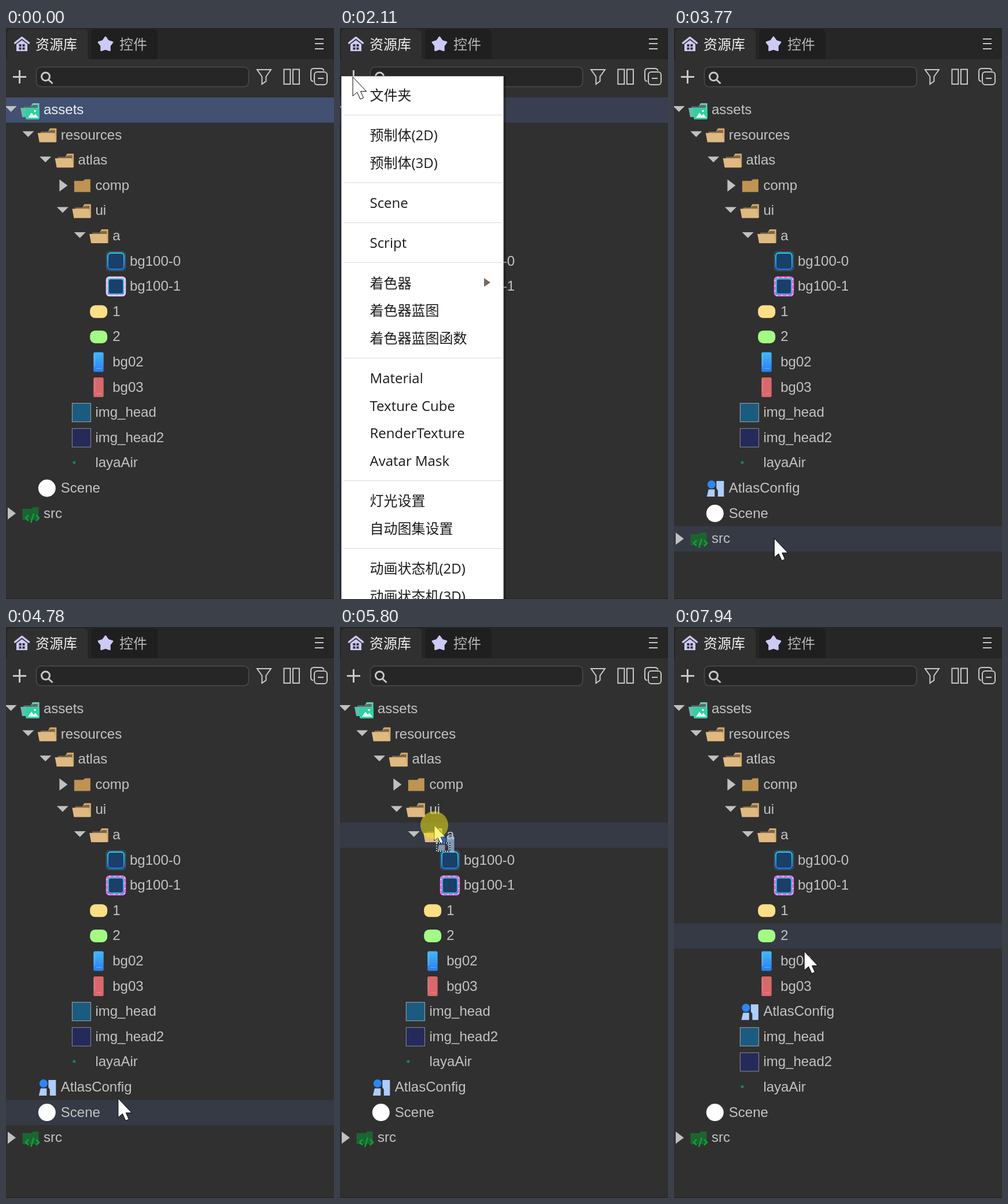
These frames come from a looping animation (567x987 px, 8000 ms). An HTML page:

```html
<!DOCTYPE html>
<html lang="zh-CN">
<head>
<meta charset="utf-8">
<title>Asset panel</title>
<style>
html, body { margin: 0; width: 100%; height: 100%; overflow: hidden; background: #303030; }
svg { display: block; width: 100%; height: 100%; }
.tree { font: 24px "Liberation Sans", Arial, sans-serif; fill: #c3c3c3; }
.tab { font: 24px "Noto Sans CJK SC", "Noto Sans CJK", sans-serif; }
.menu { font: 24px "Open Sans", "Noto Sans CJK SC", "Noto Sans CJK", sans-serif; fill: #1b1b1b; }
.line { fill: none; stroke: #c8c8c8; stroke-width: 2; }
.bold { stroke-width: 3; }
</style>
</head>
<body>
<svg id="stage" viewBox="0 0 567 987" preserveAspectRatio="none"></svg>
<script>
const DURATION = 8000, ROW = 43.6, TOP = 120, INDENT = 29.8;
const MENU_ROW = 47.6, MENU_GAP = 21.7;
const MENU_OPEN = 2050, MENU_CLOSE = 3470, CREATED = 3560, MOVED = 7070;
const PRESSES = [[1780, 1980], [3360, 3470], [5330, 6930]];
const DRAG = [5400, 6930];
const HOVER_LAG = 25;

// time, x, y of the pointer tip
const PATH = [
  [0, 600, 900], [70, 566, 893], [400, 330, 520], [830, 117, 142], [1100, 117, 142],
  [1360, 65, 134], [1640, 22, 84], [2100, 22, 84], [2500, 92, 490], [2820, 138, 840],
  [3160, 140, 856], [3500, 140, 856], [4110, 249, 939], [4170, 260, 946], [4350, 260, 946],
  [4780, 194, 815], [5130, 150, 787], [5330, 150, 787], [5800, 163, 343], [6070, 157, 269],
  [6330, 154, 233], [7580, 154, 233], [7940, 225, 560], [8000, 230, 580]
];

const rect = (x, y, w, h, fill, extra = "") =>
  `<rect x="${x}" y="${y}" width="${w}" height="${h}" fill="${fill}" ${extra}/>`;
const shape = (d, fill, extra = "") => `<path d="${d}" fill="${fill}" ${extra}/>`;
const dot = (x, y, r, fill) => `<circle cx="${x}" cy="${y}" r="${r}" fill="${fill}"/>`;
const line = (d, weight = "") => `<path class="line ${weight}" d="${d}"/>`;

const openFolder = (back, front) =>
  shape("M-11 -6H2L5 -11.5H16.5V12H-11Z", back) +
  shape("M-12 -6.5H3L5.5 -8.5H14V-3.5H-12Z", "#303030", 'opacity=".55"') +
  shape("M-16 -3.5H12.5L15.5 12.5H-13Z", front);
const closedFolder = fill => shape("M-12.5 -8H3L6 -10.8H15.5V11.2H-12.5Z", fill);
const tile = (fill, stroke) => rect(-16, -16, 32, 32, fill, `stroke="${stroke}"`);
const slab = (fill, glow) =>
  rect(-9, -17, 17.5, 34, fill, 'rx="2.5"') +
  shape("M-7 -13V8M-4 11H5", "none", `stroke="${glow}" stroke-width="1.2" opacity=".5"`);
const frame =
  rect(-16.5, -16.5, 33, 33, "#1d4360", 'rx="5" stroke="#58616b"') +
  rect(-14, -14, 28, 28, "#1a3f69", 'rx="5" stroke="url(#cyan)" stroke-width="2"');

const icons = {
  assets: openFolder("#73cbb8", "#62bda9") + rect(-7, -2, 24, 18.5, "#2ed1a4", 'rx="2"') +
    shape("M-3 13.5L3 5L7 10L10 7L15 13.5Z", "#fff") + dot(9, 2, 1.8, "#fff"),
  open: openFolder("#d6aa6c", "#e0b981"),
  closed: closedFolder("#bf9352"),
  src: closedFolder("#1b6530") + `<g transform="translate(3 7)">` +
    shape("M-5 -4L-10 1L-5 6M8 -4L13 1L8 6M4 -7L-1 9", "none", 'stroke="#12a237" stroke-width="2.5"') + "</g>",
  frameBlue: frame,
  framePink: frame + rect(-15.5, -15.5, 31, 31, "none", 'id="pink" rx="4" stroke-width="3.5"') +
    rect(-15.5, -15.5, 31, 31, "none", 'rx="4" stroke="#fbe9ff" stroke-width="1.5" stroke-dasharray="2 7"') +
    rect(-12.8, -12.8, 25.6, 25.6, "none", 'rx="4" stroke="#35b9de" stroke-width="1.5"'),
  yellow: rect(-15, -11, 30, 22, "#fbde86", 'rx="9"'),
  green: rect(-15, -11, 30, 22, "#a3fb84", 'rx="9"'),
  blueSlab: slab("url(#blue)", "#9be0ff"),
  redSlab: slab("#d9686c", "#f0a0b0"),
  teal: tile("#1b5b80", "#a2aab0"),
  navy: tile("#242a5a", "#8a8d9c"),
  tiny: dot(-12.5, -1, 2.5, "#18806d"),
  scene: dot(0, 0, 15, "#fff"),
  config: dot(-6, -6.500, 7, "#2b86f6") + shape("M-11 2H-0.5V14.5H-14Z", "#aecdfa") +
    shape("M2.5 -12.5H15.5V14.5H5V4L2.5 0Z", "#aecdfa")
};

// label, depth, icon, arrow (v open, > closed)
const rows = [
  ["assets", 0, "assets", "v"], ["resources", 1, "open", "v"], ["atlas", 2, "open", "v"],
  ["comp", 3, "closed", ">"], ["ui", 3, "open", "v"], ["a", 4, "open", "v"],
  ["bg100-0", 5, "frameBlue"], ["bg100-1", 5, "framePink"], ["1", 4, "yellow"], ["2", 4, "green"],
  ["bg02", 4, "blueSlab"], ["bg03", 4, "redSlab"], ["img_head", 3, "teal"], ["img_head2", 3, "navy"],
  ["layaAir", 3, "tiny"], ["Scene", 1, "scene"], ["src", 0, "src", ">"]
];
const arrows = { v: "M-1.5 -6H18.5L8.5 4Z", ">": "M3 -10L17 0.5L3 11Z" };

const rowBody = ([label, , icon, arrow]) =>
  (arrow ? shape(arrows[arrow], "#c0c0c0") : "") +
  `<g transform="translate(41 0.5)">${icons[icon]}</g><text x="65" y="8">${label}</text>`;

const menuItems = ["文件夹", "-", "预制体(2D)", "预制体(3D)", "-", "Scene", "-", "Script", "-",
  "着色器", "着色器蓝图", "着色器蓝图函数", "-", "Material", "Texture Cube", "RenderTexture",
  "Avatar Mask", "-", "灯光设置", "自动图集设置", "-", "动画状态机(2D)", "动画状态机(3D)"];
const menuTops = [];

function buildMenu() {
  let y = 117 - MENU_ROW, body = "";
  for (const item of menuItems) {
    if (item === "-") {
      body += rect(6, Math.round(y + 32.7), 274, 1, "#d9d9d9");
      y += MENU_GAP;
      continue;
    }
    y += MENU_ROW;
    menuTops.push(y - 25.6);
    body += `<text x="51.5" y="${y + 7.8}">${item}</text>`;
    if (item === "着色器") body += shape(`M249 ${y - 9.5}L260 ${y - 2}L249 ${y + 5.5}Z`, "#75695f");
  }
  return `<g id="menu" class="menu">` + rect(0, 82, 287, 910, "#000", 'opacity=".25"') +
    rect(2.5, 83.5, 280, 920, "#fff", 'stroke="#b4b4b4"') +
    `<rect id="menuHover" x="4" width="278" height="${MENU_ROW}" fill="#e6e6e6"/>${body}</g>`;
}

function starPoints(cx, cy, outer, inner) {
  return Array.from({ length: 10 }, (_, i) => {
    const r = i % 2 ? inner : outer, a = (i / 5 - 0.5) * Math.PI;
    return `${cx + r * Math.cos(a)},${cy + r * Math.sin(a)}`;
  }).join(" ");
}

const header =
  rect(0, 0, 567, 54, "#262626") +
  shape("M2 54V10Q2 2 10 2H133Q141 2 141 10V54Z", "#303030") +
  shape("M147 54V10Q147 2 155 2H254Q262 2 262 10V54Z", "#1f1f1f") +
  shape("M15.500 26L27.500 16.500L39.500 26", "none", 'stroke="#cdcaf6" stroke-width="3.5" stroke-linecap="round" stroke-linejoin="round"') +
  shape("M18 28L27.500 21L37 28V40H18Z", "#cdcaf6") +
  shape("M22.500 28H26.500V32H22.500ZM28.500 28H32.500V32H28.500ZM22.500 33.500H26.500V37.500H22.500ZM28.500 33.500H32.500V37.500H28.500Z", "#303030") +
  `<polygon points="${starPoints(172, 28.5, 12.5, 7.5)}" fill="#cdcaf6" stroke="#cdcaf6" stroke-width="3" stroke-linejoin="round"/>` +
  `<g class="tab"><text x="51" y="37" fill="#f0f0f0">资源库</text><text x="196" y="37" fill="#b8b8b8">控件</text></g>` +
  line("M534 19H549M534 27H549M534 36H549") +
  line("M12 84.5H35M23.5 73V96", "bold") +
  rect(52.5, 67.5, 367, 34, "#262626", 'rx="8" stroke="#4b4b4b" stroke-width="1.5"') +
  line("M61.5 84a7 7 0 1 0 14 0a7 7 0 1 0 -14 0M73.5 89.5L80.5 96", "bold") +
  line("M434 72H458L449.5 84V92L442.5 97V84Z") +
  line("M480.5 71.5H491.5V97H480.5ZM496 71.5H507V97H496Z") +
  line("M531 92Q527 92 527 87V75Q527 70 532 70H544Q549 70 549.5 74") +
  rect(533, 76, 22, 22, "none", 'class="line" rx="5"') + line("M539 87H549");

const arrowShape = shape("M0 0V33L7.5 26.5L13 38.5L18.5 36L13.5 25H23.5Z", "#fff", 'stroke="#000"');

const stage = document.getElementById("stage");
stage.innerHTML = `<defs>
  <linearGradient id="cyan" x1="0" y1="0" x2="0" y2="1"><stop stop-color="#25d5f5"/><stop offset="1" stop-color="#1b80ee"/></linearGradient>
  <linearGradient id="blue" x1="0" y1="0" x2="0" y2="1"><stop stop-color="#43b8f7"/><stop offset="1" stop-color="#2b7cf3"/></linearGradient>
  </defs>` +
  rect(0, 0, 567, 987, "#303030") + header +
  `<rect id="hover" width="567" height="${ROW}" fill="#353a44"/>` +
  `<rect id="selected" y="${TOP}" width="567" height="${ROW}"/>` +
  `<g class="tree">${rows.map(r => `<g class="row">${rowBody(r)}</g>`).join("")}
  <g id="config">${rowBody(["AtlasConfig", 1, "config"])}</g></g>` +
  rect(0, 986, 567, 1, "#202020") + buildMenu() +
  `<g id="pointer"><g id="ghost" opacity=".65" transform="translate(19 32)">${icons.config}</g>
  <g id="arrow">${arrowShape}</g>
  <g id="dragBox">${rect(4, 31, 23, 14, "none", 'stroke="#111" stroke-width="2"')}
  ${rect(4, 31, 23, 14, "none", 'stroke="#ddd" stroke-width="2" stroke-dasharray="2 2"')}</g>
  <circle id="press" r="24" fill="#f3ea12" opacity=".52"/></g>`;

const $ = id => document.getElementById(id);
const rowNodes = [...document.querySelectorAll(".row")];
const show = (id, on) => $(id).setAttribute("visibility", on ? "visible" : "hidden");
const within = (t, [from, to]) => t >= from && t < to;

const slope = (i, k) => (PATH[i + 1][k] - PATH[i][k]) / (PATH[i + 1][0] - PATH[i][0]);
function tangent(i, k) {
  if (i === 0 || i === PATH.length - 1) return 0;
  const a = slope(i - 1, k), b = slope(i, k);
  return a * b > 0 ? 2 * a * b / (a + b) : 0;
}

// Monotone cubic through the path points
function pointerAt(t) {
  let i = 0;
  while (i < PATH.length - 2 && t >= PATH[i + 1][0]) i++;
  const span = PATH[i + 1][0] - PATH[i][0];
  const u = Math.max(0, (t - PATH[i][0]) / span), v = 1 - u;
  return [1, 2].map(k =>
    v * v * ((1 + 2 * u) * PATH[i][k] + u * span * tangent(i, k)) +
    u * u * ((3 - 2 * u) * PATH[i + 1][k] - v * span * tangent(i + 1, k)));
}

function place(node, index, depth) {
  node.setAttribute("transform", `translate(${depth * INDENT} ${141 + index * ROW})`);
}

function render(t) {
  const [x, y] = pointerAt(t), hoverY = pointerAt(t - HOVER_LAG)[1];
  const menuOpen = within(t, [MENU_OPEN, MENU_CLOSE]), dragging = within(t, DRAG);
  const created = t >= CREATED, moved = t >= MOVED;

  const slot = moved ? 12 : created ? 15 : Infinity;
  rows.forEach((row, i) => place(rowNodes[i], i + (i >= slot), row[1]));
  show("config", created);
  if (created) place($("config"), slot, moved ? 3 : 1);
  $("pink").setAttribute("stroke", created ? "#dc70dd" : "#e6c3ee");

  const index = Math.floor((hoverY - TOP) / ROW);
  show("hover", !menuOpen && t > 70 && index >= 0 && index < rows.length + created);
  $("hover").setAttribute("y", TOP + index * ROW);
  show("selected", !created);
  $("selected").setAttribute("fill", t < 1910 ? "#425071" : "#393f50");
  rowNodes[0].setAttribute("fill", created ? "#c3c3c3" : "#eeeeee");

  show("menu", menuOpen);
  const itemTop = menuTops.find(top => hoverY >= top && hoverY < top + MENU_ROW);
  show("menuHover", menuOpen && itemTop !== undefined);
  if (itemTop !== undefined) $("menuHover").setAttribute("y", itemTop);

  $("pointer").setAttribute("transform", `translate(${x} ${y})`);
  $("arrow").setAttribute("transform", `scale(${dragging ? 0.82 : 1})`);
  show("ghost", dragging);
  show("dragBox", dragging);
  show("press", PRESSES.some(p => within(t, p)));
}

const start = performance.now();
function tick() {
  render((performance.now() - start) % DURATION);
  requestAnimationFrame(tick);
}
tick();
</script>
</body>
</html>
```
